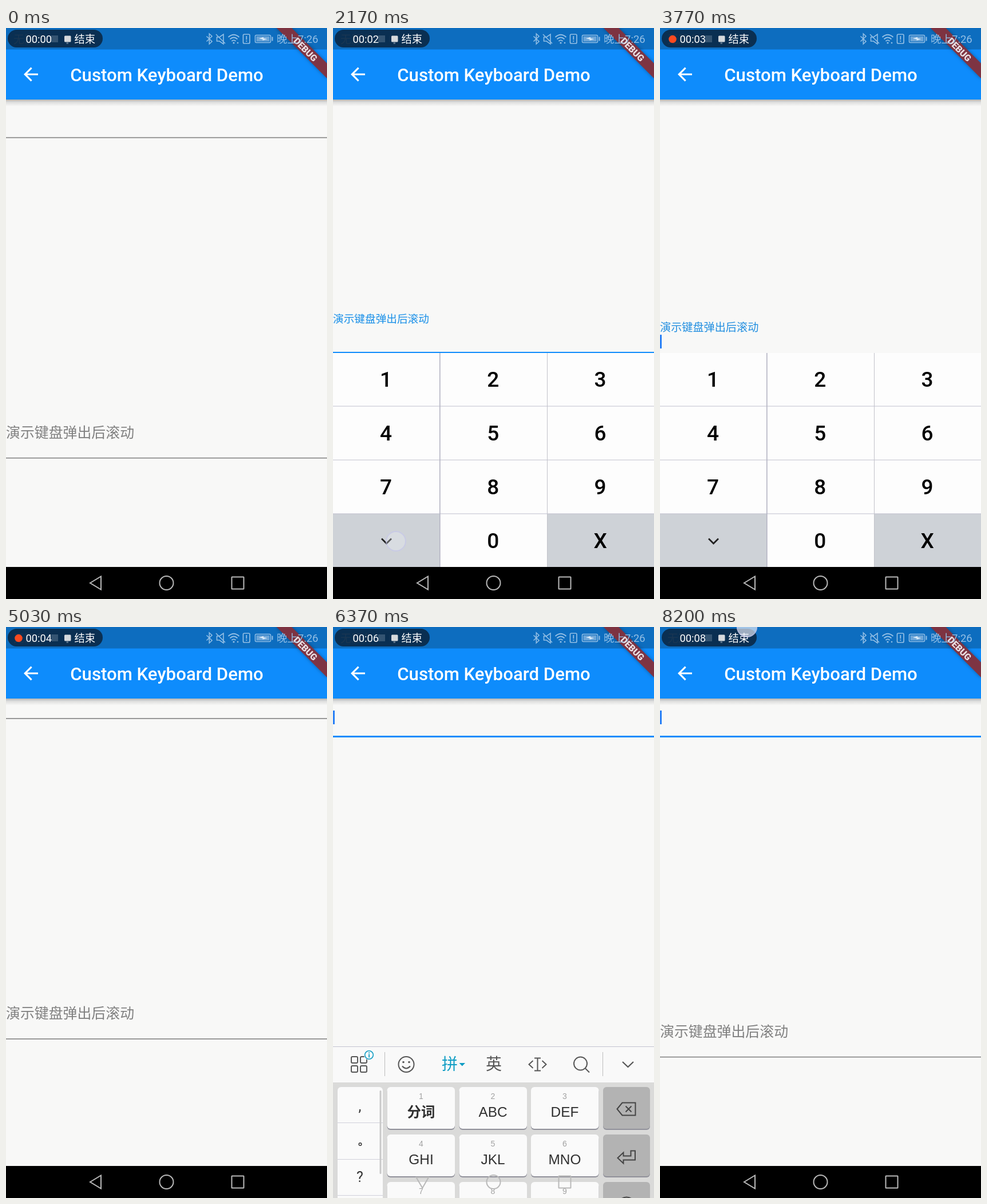
An HTML page with a canvas for the animation above (8230 ms loop, 561 px wide and 998 px high).

```html
<!DOCTYPE html>
<html lang="zh-CN">
<head>
<meta charset="utf-8">
<style>
html, body { margin: 0; width: 100%; height: 100%; overflow: hidden; background: #f8f8f7 }
canvas { display: block }
</style>
</head>
<body>
<canvas id="stage" width="561" height="998"></canvas>
<script>
const g = document.getElementById('stage').getContext('2d');
const LOOP = 8230, W = 561, H = 998;
const FONT = 'Roboto, "Noto Sans CJK SC", "Noto Sans CJK", sans-serif';
const ARIAL = '"Liberation Sans", "Noto Sans CJK SC", sans-serif';
const BLUE = '#0e8cfc', CYAN = '#109dc4', DARK = '#565656', INK = '#444';

// Custom keyboard sessions and system keyboard timing
const SESSIONS = [[470, 2330], [3605, 4620]];
const IME_IN = 6264, IME_OUT = 7563, IME_TIME = 300, IME_TRAVEL = 452;
// Caret visibility
const CARET_1 = [[6200, 7230], [7730, LOOP]];
const CARET_2 = [[470, 1070], [1300, 1800], [3605, 4270]];
// Finger: from, to, x, y
const TOUCHES = [
  [230, 450, 120, 710], [2070, 2290, 110, 897], [3470, 3590, 120, 710],
  [4270, 4560, 119, 899], [6020, 6190, 200, 160], [7480, 7660, 517, 589]
];

const during = (t, a, b) => t >= a && t < b;
const any = (t, spans) => spans.some(s => during(t, s[0], s[1]));
const prog = (t, start, time) => Math.min(1, Math.max(0, (t - start) / time));
const smooth = p => p * p * (3 - 2 * p);
const mix = (a, b, p) => `rgb(${a.map((v, i) => Math.round(v + (b[i] - v) * p))})`;
// Overdamped spring from 1 to 0
const spring = s => (22 * Math.exp(-9.07 * s) - 9.07 * Math.exp(-22 * s)) / 12.93;

function rect(x, y, w, h, color) {
  g.fillStyle = color;
  g.fillRect(x, y, w, h);
}
function round(x, y, w, h, r, color) {
  g.beginPath();
  g.roundRect(x, y, w, h, r);
  g.fillStyle = color;
  g.fill();
}
function text(s, x, y, size, color, align = 'center', weight = 400, font = FONT) {
  g.font = `${weight} ${size}px ${font}`;
  g.textAlign = align;
  g.fillStyle = color;
  g.fillText(s, x, y + size * 0.365);
}
function stroke(path, color, width = 2) {
  g.strokeStyle = color;
  g.lineWidth = width;
  g.stroke(new Path2D(path));
}
function fill(path, color) {
  g.fillStyle = color;
  g.fill(new Path2D(path));
}
function ring(x, y, r, color, width = 2) {
  g.beginPath();
  g.arc(x, y, r, 0, 7);
  g.strokeStyle = color;
  g.lineWidth = width;
  g.stroke();
}
function disc(x, y, r, color) {
  g.beginPath();
  g.arc(x, y, r, 0, 7);
  g.fillStyle = color;
  g.fill();
}
function box(x, y, w, h, r, color, width = 2) {
  g.beginPath();
  g.roundRect(x, y, w, h, r);
  g.strokeStyle = color;
  g.lineWidth = width;
  g.stroke();
}
function smiley(x, y, r, color) {
  ring(x, y, r, color);
  disc(x - 5, y - 4, 1.8, color);
  disc(x + 5, y - 4, 1.8, color);
  stroke(`M${x - 7} ${y + 3}Q${x} ${y + 11} ${x + 7} ${y + 3}`, color);
}

function underline(y, focus) {
  rect(0, y - 0.2, W, 1.6, '#828282');
  g.globalAlpha = focus;
  rect(0, y - 1, W, 3, BLUE);
  g.globalAlpha = 1;
}
function caret(y) {
  rect(0, y - 45, 3, 24, '#2c82f6');
}

function drawFields(t) {
  let focus = 0, scroll = 0;
  for (const [show, hide] of SESSIONS) {
    focus += smooth(prog(t, show, 200)) - smooth(prog(t, hide, 200));
    const free = hide + 160;
    scroll += t < free ? 184 * smooth(prog(t, show + 83, 100)) : 184 * spring((t - free) / 1000);
  }
  const y1 = 191 - scroll, y2 = 751 - scroll;
  underline(y1, smooth(prog(t, 6200, 150)));
  if (any(t, CARET_1)) caret(y1);
  if (during(t, IME_IN, IME_OUT + IME_TIME)) return;
  underline(y2, focus);
  text('演示键盘弹出后滚动', 0, y2 - 44.5 - 14.5 * focus, 24.9 * (1 - 0.25 * focus),
    mix([128, 128, 128], [24, 143, 232], focus), 'left');
  if (any(t, CARET_2)) caret(y2);
}

function drawNumpad(t) {
  let up = 0;
  for (const [show, hide] of SESSIONS)
    up += smooth(prog(t, show, 100)) - smooth(prog(t, hide, 130));
  if (up <= 0) return;
  g.save();
  g.translate(0, 375 * (1 - up));
  rect(0, 568, W, 374, '#fdfdfd');
  rect(0, 849, 187, 93, '#ced2d7');
  rect(374, 849, 187, 93, '#ced2d7');
  for (const y of [661, 755, 849]) rect(0, y - 0.5, W, 1, '#bfbfcd');
  rect(186, 568, 1.6, 374, '#b4b4c4');
  rect(374, 568, 1, 374, '#c2c2ca');
  [...'123456789 0X'].forEach((c, i) =>
    text(c, 92.5 + (i % 3) * 187.3, 613.5 + (i / 3 | 0) * 94, 37, '#000', 'center', 500));
  stroke('M85 892.5l8.5 8.5l8.5-8.5', '#222', 2.8);
  g.restore();
}

function key(col, row, dark) {
  const x = [94.5, 220.5, 346, 472][col], w = col < 3 ? 118.5 : 82;
  const y = 624 + row * 83, h = row < 3 ? 73 : 66;
  round(x, y + 2, w, h, 6, '#90909a');
  round(x, y, w, h, 6, dark ? '#b3b3b3' : '#fafafa');
}

function drawToolbar(t) {
  rect(0, 553, W, 63, '#f9f9f9');
  rect(0, 553, W, 1, '#c2c2d0');
  const pressed = during(t, 7480, 7700);
  if (pressed) round(477, 558, 78, 54, 2, '#dcdce3');
  for (const x of [32, 48]) for (const y of [571, 587]) box(x, y, 11, 11, 2, DARK);
  disc(63, 568, 9, '#f9f9f9');
  ring(63, 568, 7.3, CYAN, 1.6);
  rect(62.2, 566.5, 1.8, 6, CYAN);
  rect(62.2, 563.3, 1.8, 1.9, CYAN);
  for (const x of [90, 471]) rect(x, 563, 1, 42, '#bdbdbd');
  smiley(128, 584.5, 13.5, DARK);
  text('拼', 204, 584, 28, CYAN);
  fill('M220.5 582h10.5l-5.2 5.5z', CYAN);
  text('英', 281, 584, 28, DARK);
  stroke('M349.5 578l-7 6.5l7 6.5M365.5 578l7 6.5l-7 6.5M352 573.5h11M352 595.5h11M357.5 573.5v22', DARK);
  ring(432.5, 583, 11.5, DARK);
  stroke('M441 591.5l7 7', DARK);
  stroke('M506 580l9.5 9l9.5-9', pressed ? CYAN : DARK, 2.2);
}

function drawKeys(t) {
  round(8, 626, 79, 316, 6, '#90909a');
  round(8, 624, 79, 316, 6, '#fafafa');
  for (const y of [686, 750, 813, 877]) rect(8, y, 79, 1, '#d0d0da');
  text(',', 47, 657, 25, '#333');
  ring(47.5, 724, 2.3, '#333', 1.4);
  text('?', 47, 781, 25, '#333');
  text('!', 47, 844, 25, '#333');
  text('~', 47, 907, 24, INK);
  if (t < 6900) round(81.5, 630, 3, 146, 1.5, '#c9c9c9');

  const names = ['分词', 'ABC', 'DEF', 'GHI', 'JKL', 'MNO', 'PQRS', 'TUV', 'WXYZ'];
  names.forEach((s, i) => {
    const col = i % 3, row = i / 3 | 0, x = 154 + col * 125.5, y = 624 + row * 83;
    key(col, row);
    text(i + 1, x, y + 15.5, 14, '#a2a2a2', 'center', 400, ARIAL);
    text(s, x, y + 43.5, 24.4, '#303030', 'center', i ? 400 : 700, ARIAL);
  });
  for (let row = 0; row < 4; row++) key(3, row, true);
  stroke('M496.5 662.5l9-11h23v22h-23zM511.5 657.5l10 10M521.5 657.5l-10 10', INK);
  stroke('M497.5 748l10-9.5v6h13v-9h7.5v16h-20.5v6z', INK);
  smiley(513, 831.5, 15, INK);

  key(0, 3, true);
  key(1, 3);
  key(2, 3, true);
  text('中', 141, 907, 24, INK);
  text('/英', 153, 911, 17, '#858585', 'left');
  text('0', 279.5, 885.5, 14, '#a2a2a2', 'center', 400, ARIAL);
  round(275.5, 894, 8.5, 14, 4, '#a6a6a6');
  stroke('M272.5 903q0 8 7.2 8t7.2-8M279.7 911v4', '#a6a6a6', 1.6);
  stroke('M249.5 916v7.5h60.5v-7.5', INK, 3);
  text('符号', 405, 908, 24, INK);
  text('123', 512.5, 908, 24, INK, 'center', 400, ARIAL);
}

function drawIme(t) {
  if (!during(t, IME_IN, IME_OUT + IME_TIME)) return;
  const left = (1 - prog(t, IME_IN, IME_TIME)) ** 2 + prog(t, IME_OUT, IME_TIME) ** 2;
  g.save();
  g.translate(0, Math.round(IME_TRAVEL * left) - 7);
  rect(0, 616, W, 333, '#dadad9');
  rect(0, 949, W, 70, '#000');
  drawToolbar(t);
  drawKeys(t);
  g.restore();
}

function drawNav(t) {
  const c = '#b9b9b9';
  stroke(during(t, IME_IN, IME_OUT) ? 'M145.5 962h21.5l-10.7 18.5z' : 'M147 970l19-11.5v23z', c);
  ring(280.5, 970, 12, c);
  box(394.5, 959.5, 21, 21, 0.5, c);
}

function drawBar() {
  const shade = g.createLinearGradient(0, 125, 0, 137);
  shade.addColorStop(0, 'rgba(0,0,0,.28)');
  shade.addColorStop(0.4, 'rgba(0,0,0,.1)');
  shade.addColorStop(1, 'rgba(0,0,0,0)');
  rect(0, 125, W, 12, shade);
  rect(0, 0, W, 125, BLUE);
  rect(0, 0, W, 37.5, '#0d6dbf');
  g.save();
  g.translate(24.8, 62.3);
  g.scale(1.558, 1.558);
  fill('M20 11H7.83l5.59-5.59L12 4l-8 8 8 8 1.41-1.41L7.83 13H20z', '#fff');
  g.restore();
  text('Custom Keyboard Demo', 112.2, 82, 31.2, '#fff', 'left', 500);

  // Corner ribbon
  g.save();
  g.translate(W, 0);
  g.rotate(Math.PI / 4);
  g.shadowColor = 'rgba(0,0,0,.35)';
  g.shadowBlur = 6;
  rect(-62.3, 43.6, 124.6, 18.7, 'rgba(132,50,62,.95)');
  g.shadowBlur = 0;
  text('DEBUG', 0, 53, 15.9, '#eadfe2', 'center', 900);
  g.restore();
}

function drawStatus(t) {
  const c = '#93bfe5';
  stroke('M350.5 14.5l9.5 9l-4.7 4.5v-18l4.7 4.5l-9.5 9', c, 1.6);
  stroke('M368.5 16h4.5l7-5v17l-7-5h-4.5zM367 11l16 16', c, 1.6);
  stroke('M388.5 16q9.5-8.5 19 0M391.5 19.5q6.5-6 13 0M394.5 23q3.5-3.2 7 0', c, 1.8);
  disc(398, 26, 1.6, c);
  disc(405, 26, 1.3, c);
  box(414.5, 11, 11.5, 16, 2, c, 1.7);
  rect(419.4, 14, 1.8, 6.5, c);
  rect(419.4, 22, 1.8, 2, c);
  box(435.5, 12.5, 27, 13, 2, c, 1.5);
  rect(437.5, 14.5, 23, 9, '#6ea6d8');
  rect(464.5, 15.5, 2, 7, c);
  fill('M442 18.5l8-2.5v2l6.5 1.2l-8 2.6v-2z', '#dcecf9');
  text('晚上7:26', 473, 19.5, 18.5, c, 'left');

  // Recorder pill
  const run = Math.max(0, t - 80);
  text('无服务', 13, 20, 19, '#5d93c0', 'left');
  round(3, 3, 166, 31, 15.5, 'rgba(9,32,56,.8)');
  rect(79, 13, 12, 12, 'rgba(150,170,190,.3)');
  if (run % 1000 >= 300) disc(22, 19.5, 6.8, '#fb4a20');
  text('00:0' + Math.floor(run / 1000), 57.3, 19.5, 18.3, '#fff');
  round(102, 13.5, 11.5, 11, 1.5, '#d6d9dc');
  rect(105.5, 25, 3.5, 3, 'rgba(170,185,200,.45)');
  text('结束', 119.5, 19.5, 18.3, '#fff', 'left');
}

function finger(x, y, alpha = 0.28) {
  disc(x, y, 18, `rgba(240,243,252,${alpha})`);
  ring(x, y, 17, 'rgba(186,186,232,.5)', 2);
}

function draw(t) {
  rect(0, 0, W, H, '#f8f8f7');
  drawFields(t);
  drawNumpad(t);
  rect(0, 942, W, 56, '#000');
  drawBar();
  drawIme(t);
  drawNav(t);
  drawStatus(t);
  for (const [a, b, x, y] of TOUCHES) if (during(t, a, b)) finger(x, y);
  if (t >= 8080) {
    const p = prog(t, 8080, 110);
    finger(159 - 7 * p, 16 - 16 * p, 0.65);
  }
}

const start = performance.now();
function tick() {
  draw((performance.now() - start) % LOOP);
  requestAnimationFrame(tick);
}
tick();
</script>
</body>
</html>
```
